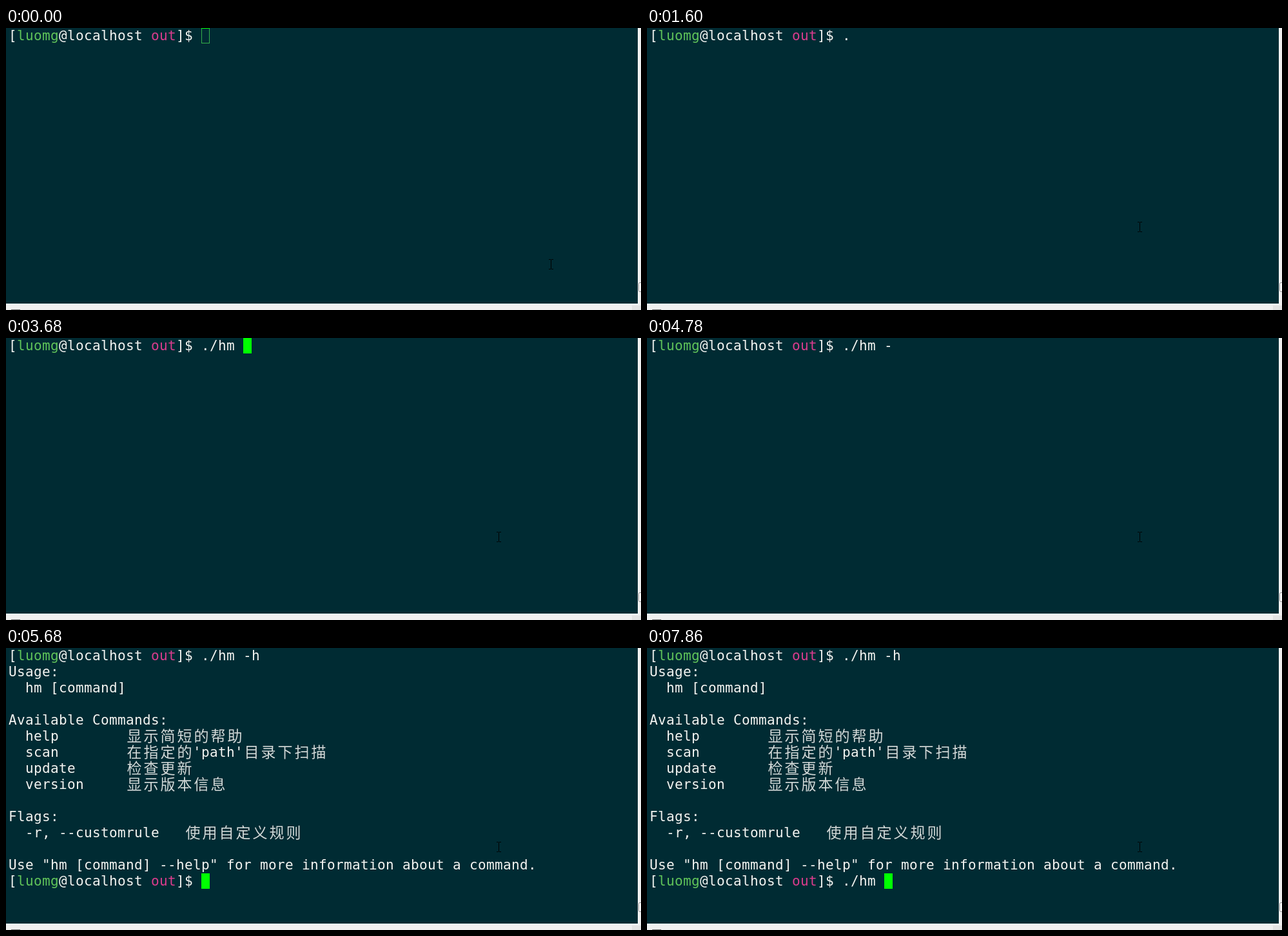
An HTML page with a canvas that plays this animation: 985x438 px, repeating every 8 s.

```html
<!DOCTYPE html>
<html lang="zh">
<head>
<meta charset="utf-8">
<title>Terminal</title>
<style>
  html, body { margin: 0; width: 100%; height: 100%; overflow: hidden; background: #002b33; }
  canvas { display: block; }
</style>
</head>
<body>
<canvas id="stage" width="985" height="438"></canvas>
<script>
const ctx = document.getElementById("stage").getContext("2d");
const LOOP = 8000, CELL = 13, LINE = 25, LEFT = 4;
const WHITE = "#f4f4f1", DIM = "#d3d8d7", GREEN = "#60c45a", PINK = "#dc3c8e", CURSOR = "#00ff00";
const LATIN = '21px "DejaVu Sans Mono", monospace';
const CJK = '300 23px "Noto Sans CJK SC", "Noto Sans CJK", sans-serif';

const HELP = `Usage:
  hm [command]

Available Commands:
  help        显示简短的帮助
  scan        在指定的'path'目录下扫描
  update      检查更新
  version     显示版本信息

Flags:
  -r, --customrule   使用自定义规则

Use "hm [command] --help" for more information about a command.`.split("\n");

const PROMPT = [["[", WHITE], ["luomg", GREEN], ["@localhost ", WHITE], ["out", PINK], ["]$ ", WHITE]];

// [start ms, typed text, cursor style]
const FIRST = [
  [0, "", "hollow"], [130, "", "block"], [1600, "."], [1770, "./"], [2010, "./yh", "block"],
  [2850, "./yh"], [2960, "./y"], [3320, "./h"], [3570, "./hm"], [3680, "./hm ", "block"],
  [4780, "./hm -"], [5280, "./hm -h"]
];
const SECOND = [
  [5680, "", "block"], [6690, "."], [7000, "./"], [7540, "./h"], [7860, "./hm ", "block"]
];
const ENTER = 5580, OUTPUT = 5680, MOUSE_MOVE = 70;

function rect(color, x, y, w, h) {
  ctx.fillStyle = color;
  ctx.fillRect(x, y, w, h);
}

// Draws text on the character grid and returns the next free column.
function print(text, col, row, color = WHITE) {
  for (const ch of text) {
    const wide = ch > "\u2e80";
    ctx.font = wide ? CJK : LATIN;
    ctx.fillStyle = wide ? DIM : color;
    ctx.fillText(ch, LEFT + col * CELL + (wide ? 1.5 : 0), row * LINE + (wide ? 20 : 19));
    col += wide ? 2 : 1;
  }
  return col;
}

function drawCursor(col, row, style) {
  const x = LEFT + col * CELL, y = row * LINE;
  rect(CURSOR, x, y, CELL, 24);
  if (style === "hollow") {
    rect("#36b04a", x, y + 1, CELL, 23);
    rect("#002b33", x + 1, y + 1, CELL - 2, 22);
  }
}

function drawPrompt(row, steps, t) {
  let col = 0;
  for (const [text, color] of PROMPT) col = print(text, col, row, color);
  const [, typed, style] = steps.filter(step => step[0] <= t).pop();
  col = print(typed, col, row);
  if (style) drawCursor(col, row, style);
}

function drawMouse(x, y) {
  rect("#000", x, y - 7, 1, 14);
  for (const edge of [y - 8, y + 7]) {
    rect("#000", x - 3, edge, 3, 1);
    rect("#000", x + 1, edge, 3, 1);
  }
}

function drawWindowEdges() {
  rect("#f0f0f0", 980, 0, 5, 428);
  ctx.beginPath();
  ctx.roundRect(981.5, 395.5, 10, 14, 2);
  ctx.fillStyle = "#ffffff";
  ctx.fill();
  ctx.strokeStyle = "#8c8c8c";
  ctx.stroke();
  rect("#f0f0f0", 0, 428, 985, 10);
  rect("#e3e3e3", 971, 431, 14, 7);
  rect("#777777", 8, 437, 14, 1);
}

function draw(t) {
  rect("#002b33", 0, 0, 985, 438);
  drawPrompt(0, FIRST, t);
  if (t >= OUTPUT) {
    HELP.forEach((line, i) => print(line, 0, i + 1));
    drawPrompt(HELP.length + 1, SECOND, t);
  } else if (t >= ENTER) {
    drawCursor(0, 1, "block");
  }
  if (t < MOUSE_MOVE) drawMouse(845, 367);
  else drawMouse(764, 309);
  drawWindowEdges();
}

const start = performance.now();
function tick() {
  draw((performance.now() - start) % LOOP);
  requestAnimationFrame(tick);
}
tick();
</script>
</body>
</html>
```
